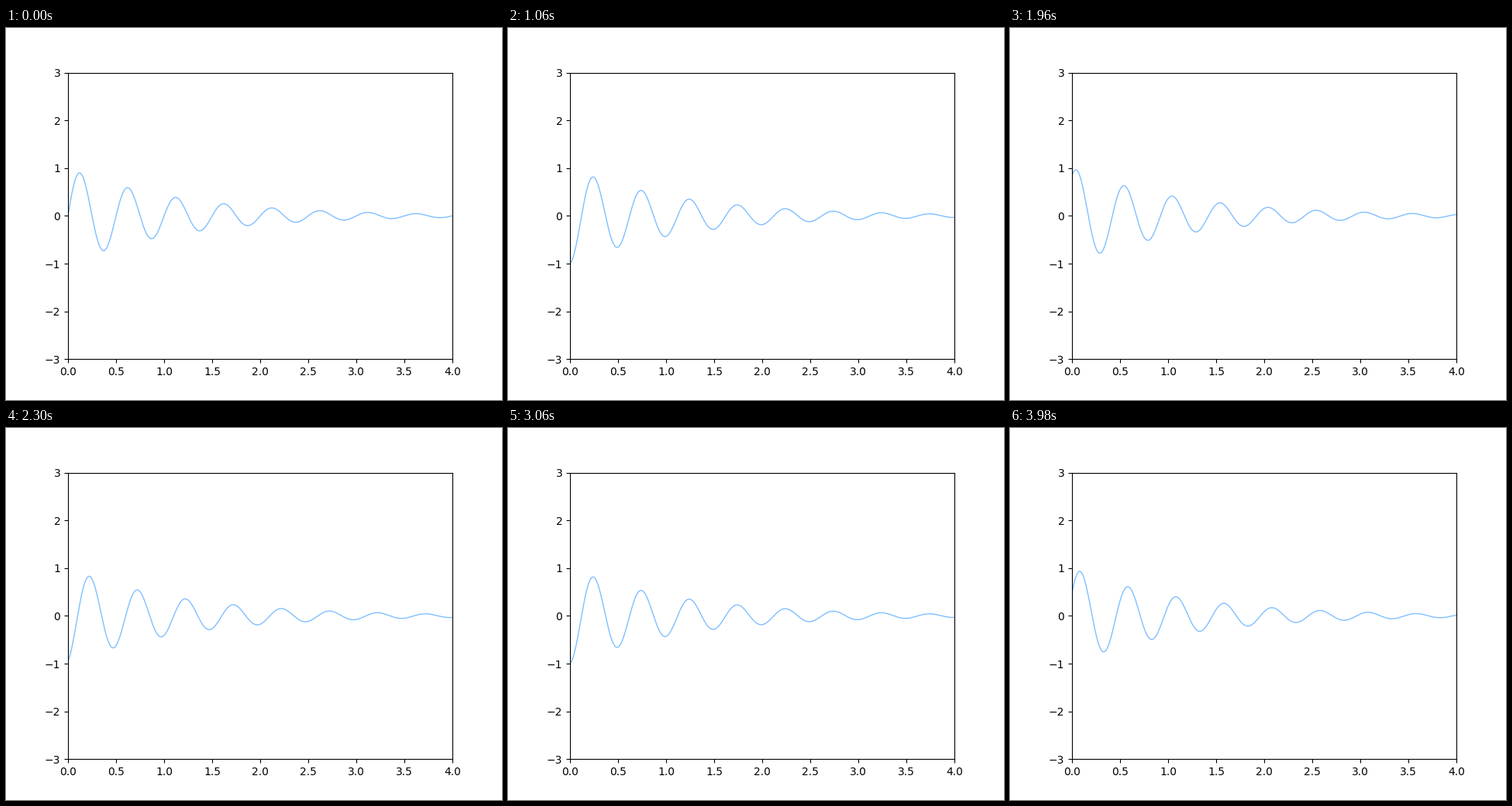
A matplotlib script for the animation above (4 s loop, 640 by 480 pixels).

```python
import numpy as np
import matplotlib.pyplot as plt
from matplotlib.animation import FuncAnimation

FRAMES = 200
INTERVAL = 20   # ms
STEP = 0.04     # travel to the right per frame, in x units
DECAY = 0.845

x = np.linspace(0, 4, 1000)
envelope = np.exp(-DECAY * x)


def wave(i):
    return envelope * np.sin(4 * np.pi * (x - STEP * i))


fig, ax = plt.subplots(figsize=(6.4, 4.8), dpi=100)
ax.set_xlim(0, 4)
ax.set_ylim(-3, 3)
line, = ax.plot(x, wave(0), color="#80bfff", lw=1)


def update(i):
    line.set_ydata(wave(i))
    return line,


anim = FuncAnimation(fig, update, frames=FRAMES, interval=INTERVAL,
                     repeat=True, repeat_delay=0)
plt.show()
```
